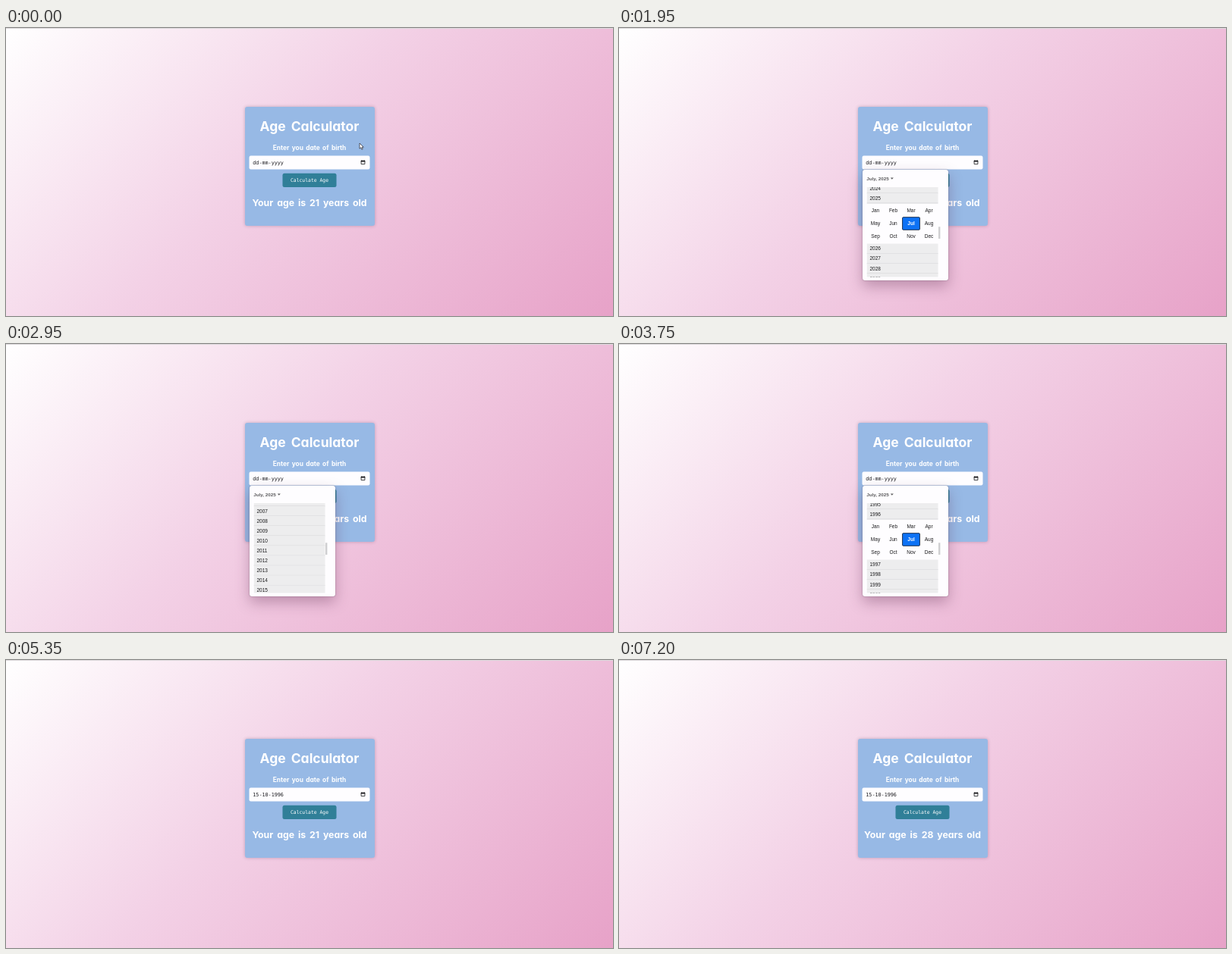
Write an HTML page that moves like this. It is 800 px wide and 380 px high and loops after 7.25 s.

```html
<!DOCTYPE html>
<html lang="en">
<head>
<meta charset="utf-8">
<title>Age Calculator</title>
<style>
  html, body { margin: 0; width: 100%; height: 100%; overflow: hidden; }
  #stage {
    position: absolute; left: 0; top: 0; width: 800px; height: 380px; overflow: hidden;
    background: linear-gradient(135deg, #fff, #f3d1e6 44%, #e7a2c8);
  }
  #stage::before {
    content: ""; position: absolute; left: 0; top: 0; width: 100%; height: 1px;
    background: #dcd8db;
  }
  #card, #popup { position: absolute; box-sizing: border-box; }
  #card {
    left: 314.5px; top: 104px; width: 171px; height: 157px; border-radius: 3px;
    background: #97b9e5; box-shadow: 0 0 4px rgba(70, 40, 70, .28);
  }
  #popup {
    left: 321px; top: 187px; width: 113px; height: 145.5px; border-radius: 3px;
    background: #fefdff;
    box-shadow: 0 0 1.5px rgba(60, 40, 60, .6), 0 8px 18px rgba(90, 40, 75, .34);
  }
  svg { position: absolute; left: 0; top: 0; }
  .comic { font-family: Inter, sans-serif; font-weight: 700; font-feature-settings: "cv11"; word-spacing: .16em; fill: #fff; text-anchor: middle; }
  .mono { font-family: "DejaVu Sans Mono", "Noto Sans Mono", monospace; }
  .ui { font-family: "Liberation Sans", Arial, sans-serif; font-size: 6.5px; fill: #1c1c1e; }
  .mid { text-anchor: middle; }
  .bold { font-weight: bold; }
  .dim { fill: #858585; }
  .link { fill: #2f80c9; }
  .pick { fill: #0d72f5; stroke: #10233f; stroke-width: .9; }
  .picked { fill: #fff; font-weight: bold; }
  .row { fill: #ededee; }
  .rule { stroke: #cbcbcd; stroke-width: .7; }
  .arrow { fill: none; stroke: #333; stroke-width: .9; }
</style>
</head>
<body>
<div id="stage">
  <div id="card"></div>
  <svg width="800" height="380">
    <text class="comic" x="400" y="135.5" font-size="17.5">Age Calculator</text>
    <text class="comic" x="400" y="160.5" font-size="8.4">Enter you date of birth</text>
    <rect x="320.5" y="168.5" width="159" height="18" rx="2.2" fill="#fefdff"/>
    <text class="mono" id="date" x="325.3" y="179.6" font-size="6.75" fill="#1b1b1f"></text>
    <path d="M468.1 175.4h4.8v4.2h-4.8z" fill="none" stroke="#17171a" stroke-width=".8"/>
    <path d="M467.8 175h5.4v1.5h-5.4zM468.6 174h.8v1h-.8zM471.6 174h.8v1h-.8z" fill="#17171a"/>
    <rect id="button" x="364.5" y="191.7" width="71" height="18.3" rx="2.5"/>
    <text class="mono mid" id="label" x="400" y="203.3" font-size="6.4">Calculate Age</text>
    <text class="comic" id="age" x="400" y="234.5" font-size="12.3"></text>
  </svg>
  <div id="popup"></div>
  <svg width="800" height="380">
    <clipPath id="listBox"><rect x="326.5" y="210" width="94.5" height="118.5"/></clipPath>
    <g id="header">
      <text class="ui bold" id="month" x="326.2" y="201" style="font-size:6.25px"></text>
      <path id="caret" d="M0 197.4h4l-2 2.4z"/>
    </g>
    <g id="calendar"></g>
    <g id="years">
      <g clip-path="url(#listBox)"><g id="list"></g></g>
      <rect x="421" y="262.3" width="2.4" height="15.7" fill="#cfcfd1"/>
    </g>
    <path id="cursor" d="M0 0v7.2l1.7-1.5 1.2 2.6 1.3-.6-1.2-2.5h2.3z"
      fill="#fff" stroke="#2b2b35" stroke-width=".75"/>
  </svg>
</div>
<script>
const LOOP = 7250, ROW = 13.07, PANEL = 53.5;
const POPUP = 450, LIST = 1500, EXPAND = 3550, MONTH = 4200, CLOSE = 5050;
const PRESS = 5650, RESULT = 5800, RELEASE = 6500;
const $ = id => document.getElementById(id);
const text = (x, y, s, cls = "mid") => `<text class="ui ${cls}" x="${x}" y="${y}">${s}</text>`;
const pick = (x, y, w, h) => `<rect class="pick" x="${x}" y="${y}" width="${w}" height="${h}" rx="1"/>`;

function calendar() {
  const colX = c => 333.8 + c * 14.58;
  let out = '<path class="arrow" d="M404.5 203.6v-8.6m-4 4l4-4 4 4M421.2 194.6v8.6m-4-4l4 4 4-4"/>';
  "Su Mo Tu We Th Fr Sa".split(" ").forEach((d, c) => out += text(colX(c), 220.2, d));
  out += pick(414.3, 240.3, 14.2, 14);
  for (let i = 0; i < 42; i++) {
    const n = i - 1;
    const day = n < 1 ? n + 30 : n > 31 ? n - 31 : n;
    const cls = n === 12 ? "picked" : day === n ? "" : "dim";
    out += text(colX(i % 7), 234.9 + Math.floor(i / 7) * 14.62, day, "mid " + cls);
  }
  return out + text(339.8, 324.5, "Clear", "mid link") + text(414.6, 324.5, "Today", "mid link");
}

// Rows sit relative to 2025, whose centre is at y 224.5 before scrolling.
function yearList(open) {
  let out = "";
  for (let year = 1985; year <= 2032; year++) {
    const y = 224.5 + (year - 2025) * ROW + (year > open ? PANEL : 0);
    out += `<rect class="row" x="326.5" y="${y - 6.5}" width="94" height="${ROW}"/>`
      + `<path class="rule" d="M326.5 ${y + 6.6}h94"/>` + text(330.5, y + 2.3, year, "");
    if (year === open) out += months(y);
  }
  return out;
}

function months(y) {
  const names = "Jan Feb Mar Apr May Jun Jul Aug Sep Oct Nov Dec".split(" ");
  return pick(373.6, y + 25.2, 22.8, 16.6) + names.map((name, i) =>
    text(338 + i % 4 * 23.5, y + 18.1 + Math.floor(i / 4) * 17.4, name, i === 6 ? "mid picked" : "mid")).join("");
}

// Linear interpolation through [time, value] points.
function track(points, t) {
  const i = points.findIndex(p => p[0] > t);
  if (i === 0) return points[0][1];
  if (i < 0) return points[points.length - 1][1];
  const [t0, a] = points[i - 1], [t1, b] = points[i];
  return a + (b - a) * (t - t0) / (t1 - t0);
}

const cursorX = [[100, 466], [350, 469], [450, 469], [750, 371], [1250, 345]];
const cursorY = [[100, 152], [350, 176], [450, 176], [750, 219], [1250, 199]];
const scroll = [[2100, 0], [2950, 230.8], [3450, 29 * ROW]];

function show(id, on) { $(id).style.visibility = on ? "visible" : "hidden"; }
function setText(id, s) { if ($(id).textContent !== s) $(id).textContent = s; }

let opened;
function draw(t) {
  const popup = t >= POPUP && t < CLOSE;
  const years = t >= LIST && t < MONTH;
  const pressed = t >= PRESS && t < RELEASE;
  const later = t >= MONTH;
  show("popup", popup);
  show("header", popup);
  show("calendar", popup && !years);
  show("years", years);
  show("cursor", t < LIST);
  setText("date", t < MONTH ? "dd-mm-yyyy" : t < CLOSE ? "12-10-1996" : "15-10-1996");
  setText("age", `Your age is ${t < RESULT ? 21 : 28} years old`);
  setText("month", later ? "October, 1996" : "July, 2025");
  $("header").style.opacity = years ? .72 : 1;
  $("month").style.fill = $("caret").style.fill = "#1c1c1e";
  $("caret").setAttribute("transform", `translate(${later ? 369.4 : 357.8} 0)`);
  $("button").style.fill = pressed ? "#1d596d" : "#307f98";
  $("button").style.stroke = pressed ? "#37505f" : "none";
  $("label").style.fill = pressed ? "#bfc6cc" : "#fff";
  const open = t < EXPAND ? 2025 : 1996;
  if (open !== opened) $("list").innerHTML = yearList(opened = open);
  $("list").setAttribute("transform", `translate(0 ${track(scroll, t)})`);
  $("cursor").setAttribute("transform", `translate(${track(cursorX, t)} ${track(cursorY, t)})`);
}

$("calendar").innerHTML = calendar();
const start = performance.now();
function tick() {
  draw((performance.now() - start) % LOOP);
  requestAnimationFrame(tick);
}
tick();
</script>
</body>
</html>
```
